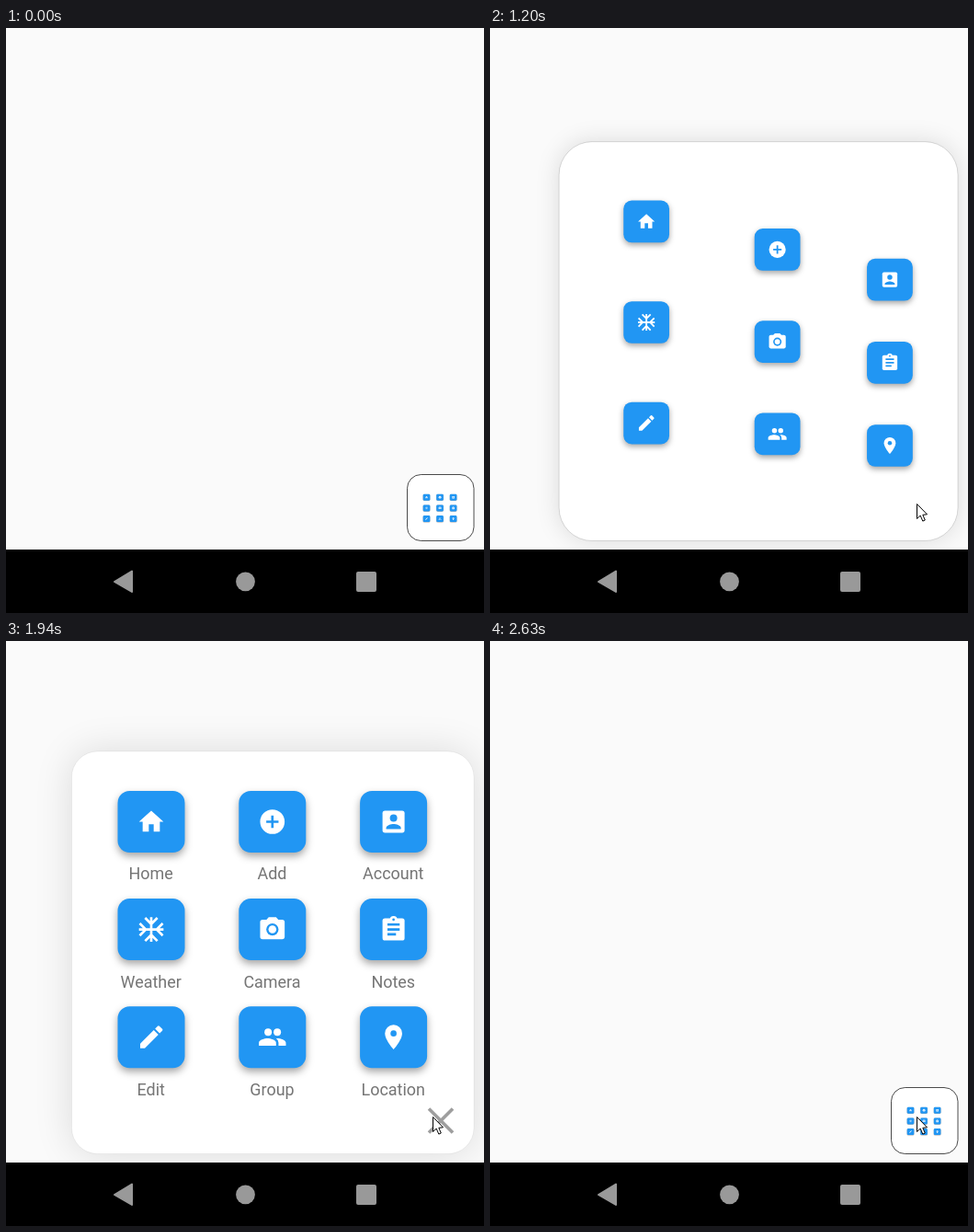
These frames come from a looping animation (520 px wide and 636 px high, 3060 ms). An HTML page with a canvas:

```html
<!DOCTYPE html>
<html lang="en">
<head>
<meta charset="utf-8">
<title>Expanding menu</title>
<style>
  html, body { margin: 0; width: 100%; height: 100%; overflow: hidden; background: #fafafa; }
  canvas { display: block; }
</style>
</head>
<body>
<canvas id="stage" width="520" height="636"></canvas>
<script>
const ctx = document.getElementById('stage').getContext('2d');
const LOOP = 3060, BLUE = '#2196f3', WHITE = '#fff';
const OPEN = 876, LABELS = 1427, DISMISS = 1976, CLOSE = 2262;
const BTN = { w: 73, h: 67, mini: 7.6 / 73 };

const clamp = v => Math.min(1, Math.max(0, v));
const lerp = (a, b, k) => a + (b - a) * k;

// cubic-bezier(.42, 0, .58, 1), solved by bisection
function easeInOut(x) {
  if (x <= 0) return 0;
  if (x >= 1) return 1;
  let lo = 0, hi = 1;
  for (let i = 0; i < 20; i++) {
    const u = (lo + hi) / 2, v = 1 - u;
    if (1.26 * u * v * v + 1.74 * u * u * v + u * u * u < x) lo = u; else hi = u;
  }
  return lo * lo * (3 - 2 * lo);
}

function elasticOut(x) {
  if (x <= 0) return 0;
  if (x >= 1) return 1;
  return 1 + 2 ** (-10 * x) * Math.sin((x - 0.1) * Math.PI * 5);
}

function fillPoly(color, ...points) {
  ctx.fillStyle = color;
  ctx.beginPath();
  for (let i = 0; i < points.length; i += 2) ctx.lineTo(points[i], points[i + 1]);
  ctx.closePath();
  ctx.fill();
}
function fillDot(color, x, y, r) {
  ctx.fillStyle = color;
  ctx.beginPath();
  ctx.arc(x, y, r, 0, 2 * Math.PI);
  ctx.fill();
}
function fillBox(color, x, y, w, h, r = 0) {
  ctx.fillStyle = color;
  ctx.beginPath();
  ctx.roundRect(x, y, w, h, r);
  ctx.fill();
}
function strokeLines(color, width, ...lines) {
  ctx.strokeStyle = color;
  ctx.lineWidth = width;
  ctx.beginPath();
  for (const [x1, y1, x2, y2] of lines) { ctx.moveTo(x1, y1); ctx.lineTo(x2, y2); }
  ctx.stroke();
}

// Icons are drawn in a 24-unit square
function home() {
  fillPoly(WHITE, 12, 3, 22, 12, 19, 12, 19, 20, 14, 20, 14, 14, 10, 14, 10, 20, 5, 20, 5, 12, 2, 12);
}
function add() {
  fillDot(WHITE, 12, 12, 10);
  strokeLines(BLUE, 2, [7, 12, 17, 12], [12, 7, 12, 17]);
}
function account() {
  fillBox(WHITE, 3, 3, 18, 18, 2);
  fillDot(BLUE, 12, 9, 3);
  ctx.beginPath();
  ctx.moveTo(6, 18);
  ctx.lineTo(6, 17);
  ctx.bezierCurveTo(6, 15, 10, 13.9, 12, 13.9);
  ctx.bezierCurveTo(14, 13.9, 18, 15, 18, 17);
  ctx.lineTo(18, 18);
  ctx.fill();
}
function snow() {
  ctx.save();
  ctx.translate(12, 12);
  for (let i = 0; i < 4; i++) {
    strokeLines(WHITE, 2, [0, 0, 0, -10], [0, -4.4, -5, -9.4], [0, -4.4, 5, -9.4]);
    ctx.rotate(Math.PI / 2);
  }
  ctx.restore();
}
function camera() {
  fillBox(WHITE, 2, 4, 20, 16, 2);
  fillPoly(WHITE, 9, 2, 15, 2, 17, 4.2, 7, 4.2);
  fillDot(BLUE, 12, 12, 5);
  fillDot(WHITE, 12, 12, 3.2);
}
function notes() {
  fillBox(WHITE, 3, 3, 18, 18, 2);
  fillDot(WHITE, 12, 4, 3);
  fillDot(BLUE, 12, 4, 1);
  strokeLines(BLUE, 2, [7, 8, 17, 8], [7, 12, 17, 12], [7, 16, 14, 16]);
}
function edit() {
  fillPoly(WHITE, 3, 17.25, 14.06, 6.19, 17.81, 9.94, 6.75, 21, 3, 21);
  ctx.save();
  ctx.translate(17.95, 6.05);
  ctx.rotate(Math.PI / 4);
  fillBox(WHITE, -2.65, -2.65, 5.3, 4, [1, 1, 0, 0]);
  ctx.restore();
}
function group() {
  fillDot(WHITE, 16, 8, 3);
  fillDot(WHITE, 8.5, 8, 3);
  ctx.beginPath();
  ctx.moveTo(1, 19);
  ctx.lineTo(1, 16.5);
  ctx.bezierCurveTo(1, 14.2, 5.7, 13, 8, 13);
  ctx.bezierCurveTo(10.3, 13, 15, 14.2, 15, 16.5);
  ctx.lineTo(15, 19);
  ctx.closePath();
  ctx.moveTo(17, 19);
  ctx.lineTo(17, 16.5);
  ctx.quadraticCurveTo(17, 14.5, 15, 13.05);
  ctx.bezierCurveTo(18, 12.8, 23, 14.2, 23, 16.5);
  ctx.lineTo(23, 19);
  ctx.fill();
}
function pin() {
  ctx.fillStyle = WHITE;
  ctx.beginPath();
  ctx.arc(12, 9, 7, Math.PI, 0);
  ctx.bezierCurveTo(19, 14.25, 12, 22, 12, 22);
  ctx.bezierCurveTo(12, 22, 5, 14.25, 5, 9);
  ctx.fill();
  fillDot(BLUE, 12, 9, 2.5);
}

const ITEMS = [
  ['Home', home], ['Add', add], ['Account', account],
  ['Weather', snow], ['Camera', camera], ['Notes', notes],
  ['Edit', edit], ['Group', group], ['Location', pin]
].map(([label, icon], i) => {
  const col = i % 3, row = Math.floor(i / 3);
  return {
    label, icon, col,
    from: { x: 453.7 + 14.55 * col, y: 506.7 + 11.7 * row },
    to: { x: 121.5 + 131.8 * col, y: 163 + 117.1 * row }
  };
});

function menuState(t) {
  const closing = t >= CLOSE;
  const rise = d => easeInOut((t - OPEN) / d);
  const fall = d => 1 - easeInOut((t - CLOSE) / d);
  const panel = closing ? fall(225) : rise(350);
  const size = closing ? fall(302) : rise(555);
  const shrink = 1 - easeInOut((t - DISMISS) / 270);
  const pop = d => elasticOut((t - LABELS) / d) * shrink;
  return {
    panel, size,
    decor: closing ? panel : size,
    bulge: closing ? 0 : 9 * Math.sin(Math.PI * size),
    columns: [400, 450, 500].map(d => closing ? size : rise(d)),
    label: pop(700),
    cross: pop(500)
  };
}

function drawPanel({ panel, decor, bulge }) {
  const x = lerp(436.5, 71.5, panel), y = lerp(485.5, 120, panel);
  const radius = lerp(15, 28, panel) + bulge;
  ctx.save();
  if (decor > 0) {
    ctx.shadowColor = `rgba(0,0,0,${0.13 * Math.min(1, decor * 3)})`;
    ctx.shadowBlur = 42 * decor;
  }
  fillBox(WHITE, x, y, 509 - x, 557.5 - y, radius);
  ctx.restore();
  ctx.strokeStyle = `rgba(0,0,0,${0.05 + 0.65 * (1 - decor) ** 2})`;
  ctx.lineWidth = 1;
  ctx.stroke();
}

function drawButton(item, state) {
  const k = state.columns[item.col];
  const scale = lerp(BTN.mini, 1, state.size);
  ctx.save();
  ctx.translate(lerp(item.from.x, item.to.x, k), lerp(item.from.y, item.to.y, k));
  ctx.scale(scale, scale);
  ctx.shadowColor = 'rgba(0,0,0,.36)';
  ctx.shadowBlur = 9 * scale;
  ctx.shadowOffsetY = 4 * scale;
  fillBox(BLUE, 0, 0, BTN.w, BTN.h, 13);
  ctx.shadowColor = 'transparent';
  ctx.translate(BTN.w / 2, BTN.h / 2);
  ctx.scale(4 / 3, 4 / 3);
  ctx.translate(-12, -12);
  item.icon();
  ctx.restore();
}

function drawLabel({ label, to }, scale) {
  if (scale < 0.01) return;
  ctx.save();
  ctx.translate(to.x, to.y + 79.6);
  ctx.scale(scale, scale);
  ctx.font = '18px Roboto, sans-serif';
  ctx.textAlign = 'center';
  ctx.fillStyle = '#757575';
  ctx.fillText(label, 36.3, 16.9);
  ctx.restore();
}

function drawCross(scale) {
  if (scale < 0.01) return;
  ctx.save();
  ctx.translate(473, 521.5);
  ctx.scale(scale, scale);
  strokeLines('#9e9e9e', 3.6, [-13, -13, 13, 13], [13, -13, -13, 13]);
  ctx.restore();
}

function drawNavBar() {
  const grey = '#999';
  fillBox('#000', 0, 567, 520, 69);
  fillPoly(grey, 118, 602, 137, 590.5, 137, 613);
  ctx.lineJoin = 'round';
  ctx.strokeStyle = grey;
  ctx.lineWidth = 2;
  ctx.stroke();
  fillDot(grey, 260.5, 601.8, 10.4);
  fillBox(grey, 381, 591, 22, 22, 2);
}

function drawCursor(t) {
  if (t < 290) return;
  const k = easeInOut((t - 265) / 480);
  ctx.save();
  ctx.translate(lerp(453, 464, k) + 0.5, lerp(632, 517, k) + 0.5);
  fillPoly(WHITE, 0, 0, 0, 16, 3.7, 12.6, 6.3, 18.6, 8.8, 17.5, 6.3, 11.8, 11, 11.3);
  ctx.lineJoin = 'miter';
  ctx.strokeStyle = '#000';
  ctx.lineWidth = 1;
  ctx.stroke();
  ctx.restore();
}

function render(t) {
  const state = menuState(t);
  fillBox('#fafafa', 0, 0, 520, 636);
  drawPanel(state);
  for (const item of ITEMS) {
    drawButton(item, state);
    drawLabel(item, state.label);
  }
  drawCross(state.cross);
  drawNavBar();
  drawCursor(t);
}

const start = performance.now();
function tick() {
  render((performance.now() - start) % LOOP);
  requestAnimationFrame(tick);
}
tick();
</script>
</body>
</html>
```
